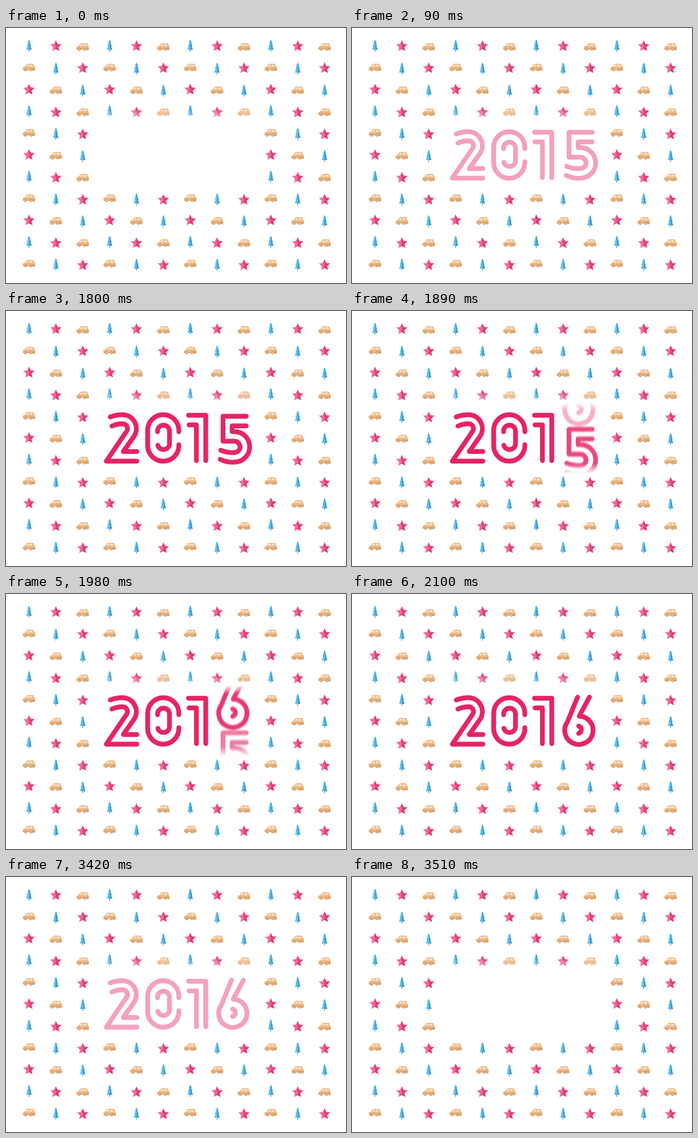
Animation of 600x450 px, one loop 3600 ms. Source, as an HTML page:

```html
<!DOCTYPE html>
<html lang="en">
<head>
<meta charset="utf-8">
<title>New year</title>
<style>
  html, body { margin: 0; width: 100%; height: 100%; overflow: hidden; background: #fff; }
  svg { display: block; width: 600px; height: 450px; }
  #year { fill: none; stroke: #e62465; stroke-width: 8.4; stroke-linecap: round; stroke-linejoin: round; }
</style>
</head>
<body>
<svg viewBox="0 0 600 450">
  <defs>
    <g id="tree">
      <path d="M0-11L-2.6-5H-1.7L-3.8 1H-2.7L-5 7.500H0Z" fill="#62bfe8"/>
      <path d="M0-11L2.6-5H1.7L3.8 1H2.700L5 7.500H0Z" fill="#319fd8"/>
      <path d="M0 7V11" stroke="#4a9cc8" stroke-width="1.3"/>
    </g>
    <g id="star"></g>
    <g id="car">
      <path d="M-7.500-.5L-4.500-5.500Q-4-6.300-2.500-6.300H6.500Q8-6.300 8.600-5L10.300-.5Z" fill="#e6ad78"/>
      <path d="M-5.800-1L-3.400-5H.2L-.8-1ZM.6-1L1.500-5H5.600L6.500-1ZM7.500-1L6.800-5H7.600L9-1Z" fill="#fae4cb"/>
      <path d="M-11 4V1.500Q-11-.8-7.500-1.300H9.500Q11-1 11 1.500V3.500Q11 4.700 10 4.700H-10Q-11 4.700-11 4Z" fill="#edb883"/>
      <path d="M-10.800 3.800H10.800" stroke="#dda069"/>
      <g fill="#f2cfa7" stroke="#c88d57" stroke-width="1.2">
        <circle cx="-6" cy="4.1" r="2"/><circle cx="3.500" cy="4.300" r="2"/><circle cx="8.500" cy="3.800" r="1.600"/>
      </g>
    </g>
    <linearGradient id="haze" x2="0" y2="1">
      <stop stop-color="#fff" stop-opacity="0"/>
      <stop offset="1" stop-color="#fff" stop-opacity=".6"/>
    </linearGradient>
    <linearGradient id="edges" gradientUnits="userSpaceOnUse" x1="0" y1="161" x2="0" y2="287">
      <stop stop-color="#000"/>
      <stop offset=".12" stop-color="#fff"/>
      <stop offset=".86" stop-color="#fff"/>
      <stop offset="1" stop-color="#000"/>
    </linearGradient>
    <mask id="window" maskUnits="userSpaceOnUse" x="365" y="161" width="76" height="126">
      <rect x="365" y="161" width="76" height="126" fill="url(#edges)"/>
    </mask>
    <filter id="blur" filterUnits="userSpaceOnUse" x="360" y="60" width="90" height="330" color-interpolation-filters="sRGB">
      <feGaussianBlur id="blurAmount" stdDeviation="0"/>
    </filter>
  </defs>
  <g id="pattern"></g>
  <rect x="165" y="144" width="275" height="17" fill="url(#haze)"/>
  <g id="year">
    <path d="M184 187Q194 183 206 183A24.500 24.500 0 0 1 226 221L207 248H231"/>
    <path d="M187 203Q196 199 206 199A8.500 8.500 0 0 1 213 212L177 265H231"/>
    <path d="M305 213V210.500A27.500 27.500 0 0 0 250 210.500V237.500A27.500 27.500 0 0 0 305 237.500V236"/>
    <path d="M267.500 213V212A10.500 10.500 0 0 1 288.500 212V235A10.500 10.500 0 0 1 268 237"/>
    <path d="M322 184H352.500V264M323 201H336V264"/>
    <g mask="url(#window)">
      <g id="roll">
        <path id="five" d="M424 184H383V228H403A10 10 0 0 1 403 248Q390 249 379 244
          M424 201H399V211H403A27 27 0 0 1 403 265Q390 266 378 260"/>
        <path id="six" d="M398 182L380 226A25 25 0 1 0 401 215.500L419 182M400 233A7.500 7 0 0 1 400 246"/>
      </g>
    </g>
  </g>
</svg>
<script>
const $ = id => document.getElementById(id);
const clamp = v => Math.min(1, Math.max(0, v));

// Star: light and dark facets meeting along its spokes
const corner = i => {
  const radius = i % 2 ? 4.9 : 10, angle = i * Math.PI / 5;
  return `${radius * Math.sin(angle)},${.9 - radius * Math.cos(angle)}`;
};
$('star').innerHTML = Array.from({ length: 10 }, (_, i) => {
  const shades = i < 5 ? ['#e52463', '#ee4279'] : ['#f0719b', '#e8568a'];
  const color = shades[i % 2];
  return `<path d="M0,.9L${corner(i)}L${corner(i + 1)}Z" fill="${color}" stroke="${color}" stroke-width=".3"/>`;
}).join('');

const icons = ['tree', 'star', 'car'];
let pattern = '';
for (let row = 0; row < 11; row++) {
  for (let col = 0; col < 12; col++) {
    if (row > 3 && row < 7 && col > 2 && col < 9) continue;
    const icon = icons[(col - row + 12) % 3];
    const lift = icon === 'star' && row < 2 ? 1.6 : 0;
    const x = 40.5 + 47.42 * col;
    const y = 31 + 38.45 * row + [0, 1.8, 2.2][col % 3] - lift;
    pattern += `<use href="#${icon}" x="${x}" y="${y}"/>`;
  }
}
$('pattern').innerHTML = pattern;

const LOOP = 3600, STEP = 30, ROLL = 91;

function draw(now) {
  const time = Math.floor(now % LOOP / STEP) * STEP;
  $('year').style.opacity = Math.min(clamp(time / 210), clamp((3510 - time) / 210));

  const phase = time >= 2100 ? 1 : clamp((time - 1770) / 344);
  const shift = (1 - Math.cos(Math.PI * phase)) / 2;
  const moving = phase > 0 && phase < 1;
  $('five').setAttribute('transform', `translate(0 ${ROLL * shift})`);
  $('six').setAttribute('transform', `translate(0 ${ROLL * (shift - 1)})`);
  $('five').style.opacity = phase === 1 ? 0 : 1 - .6 * shift;
  $('six').style.opacity = clamp(1.35 * shift);
  $('blurAmount').setAttribute('stdDeviation', `0 ${1.5 * Math.sin(Math.PI * phase)}`);
  if (moving) $('roll').setAttribute('filter', 'url(#blur)');
  else $('roll').removeAttribute('filter');
}

let start;
function tick(now) {
  start ??= now;
  draw(now - start);
  requestAnimationFrame(tick);
}
draw(0);
requestAnimationFrame(tick);
</script>
</body>
</html>
```
